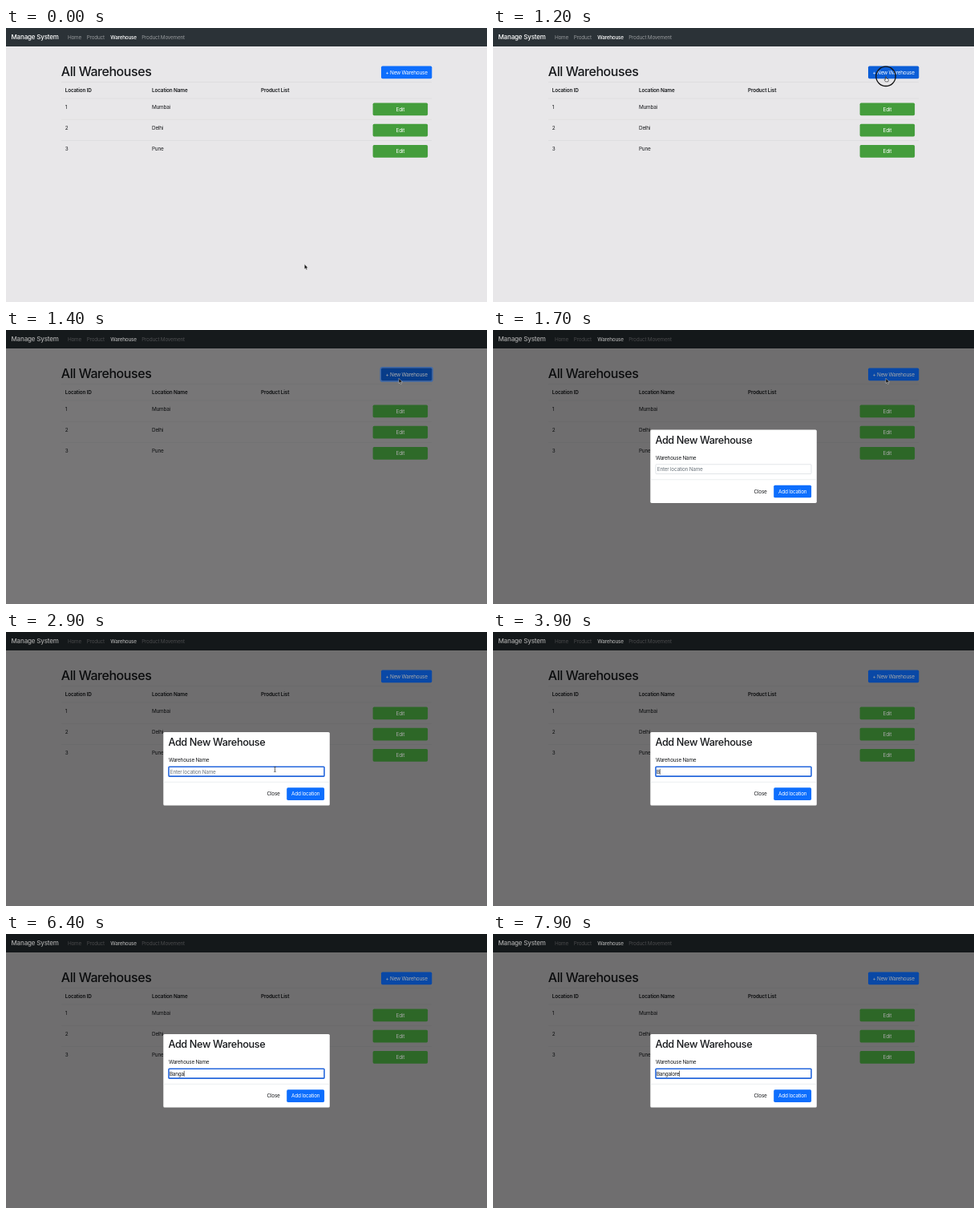
Animation, 600 px wide and 342 px high, one loop 8000 ms. Source, as an HTML page:

```html
<!DOCTYPE html>
<html lang="en">
<head>
<meta charset="utf-8">
<title>All Warehouses</title>
<style>
  html, body { margin: 0; width: 100%; height: 100%; overflow: hidden; background: #e8e7e9; }
  svg { display: block; width: 100vw; height: 100vh; }
  text { font: 400 6.4px Inter, "Open Sans", sans-serif; letter-spacing: -.035em; fill: #17191c; white-space: pre; }
  .brand { font-size: 8px; font-weight: 500; letter-spacing: -.022em; fill: #fff; }
  .link { fill: #95989b; }
  .active { font-weight: 500; fill: #fff; }
  .title { font-size: 16px; font-weight: 500; letter-spacing: -.028em; }
  .heading { font-size: 12.7px; font-weight: 500; letter-spacing: -.03em; }
  .head { font-weight: 600; letter-spacing: -.022em; }
  .label { fill: #fff; text-anchor: middle; }
  .rule { stroke: #d8d8da; stroke-width: .6; }
  .hint { fill: #6c757d; }
</style>
</head>
<body>
<svg viewBox="0 0 600 342" preserveAspectRatio="none">
  <rect width="600" height="342" fill="#e8e7e9"/>
  <rect width="600" height="23" fill="#2b3237"/>
  <g id="page"></g>
  <rect id="backdrop" width="600" height="342"/>
  <g id="vivid">
    <text class="brand" x="6.5" y="14.2">Manage System</text>
    <text class="active" x="130.3" y="14">Warehouse</text>
    <g id="edits"></g>
    <rect id="halo" x="467.2" y="46.8" width="64.9" height="17.3" rx="2.4" fill="none" stroke="#5b9bfb" stroke-width="1.5"/>
    <rect id="create" x="468" y="47.6" width="63.3" height="15.7" rx="1.7"/>
    <text class="label" x="499.6" y="58">+ New Warehouse</text>
  </g>
  <g id="modal">
    <rect x="196.3" y="125" width="207.5" height="91.5" rx="1.6" fill="#fff"/>
    <text class="heading" x="202.4" y="142.4">Add New Warehouse</text>
    <text x="202.9" y="162.4">Warehouse Name</text>
    <rect id="input" x="203" y="168.3" width="194" height="11.8" rx=".8" fill="#fff"/>
    <text id="hint" class="hint" x="204.8" y="176.6">Enter location Name</text>
    <text id="typed" x="203.9" y="176.6"></text>
    <rect id="caret" y="170.6" width=".6" height="7.4" fill="#111"/>
    <path d="M196.3 187.3H403.8" stroke="#dee2e6" stroke-width=".6"/>
    <text x="325.6" y="204.3">Close</text>
    <rect x="350.2" y="194.2" width="46.9" height="15.7" rx="1.7" fill="#0d6efd"/>
    <text class="label" x="373.7" y="204.3">Add location</text>
  </g>
  <g id="pointer">
    <circle id="ring" r="12.2" fill="none" stroke="#111" stroke-width="1.3"/>
    <path id="arrow" d="M0 0V6.2L1.4 5L2.4 7.2L3.4 6.8L2.5 4.6H4.4Z" fill="#111" stroke="#fff" stroke-width=".4"/>
    <path id="hand" d="M-.5 .4Q0-.2.5.4V2.7L3 3.3Q3.5 3.5 3.4 4.3L2.8 6.6H-.4L-2 4.2Q-1.8 3.4-.5 4.2Z" fill="#fff" stroke="#111" stroke-width=".6"/>
    <path id="beam" d="M-1.1-3Q0-3 0-2.2V2.6Q0 3.3-1.1 3.3M1.1-3Q0-3 0-2.2M0 2.6Q0 3.3 1.1 3.3" fill="none" stroke="#222" stroke-width=".7"/>
  </g>
</svg>
<script>
const LOOP = 8000, STEP = 100;
const $ = id => document.getElementById(id);
const smooth = p => p * p * (3 - 2 * p);
const easeOut = p => 1 - (1 - p) ** 2;

// Value at time t along [time, value] keys.
function track(t, keys, ease = p => p) {
  const next = keys.findIndex(([time]) => time > t);
  if (next === 0) return keys[0][1];
  if (next < 0) return keys[keys.length - 1][1];
  const [t0, v0] = keys[next - 1], [t1, v1] = keys[next];
  return v0 + (v1 - v0) * ease((t - t0) / (t1 - t0));
}
const within = (t, from, to) => t >= from && t < to;
const show = (id, on) => $(id).setAttribute("visibility", on ? "visible" : "hidden");
const label = (x, y, text, cls = "") => `<text class="${cls}" x="${x}" y="${y}">${text}</text>`;

const cities = ["Mumbai", "Delhi", "Pune"];
const rowY = i => 93.6 + i * 26.25;

$("page").innerHTML =
  label(76.9, 14, "Home", "link") +
  label(100.8, 14, "Product", "link") +
  label(169.2, 14, "Product Movement", "link") +
  label(68.8, 60, "All Warehouses", "title") +
  label(73.7, 80, "Location ID", "head") +
  label(182, 80, "Location Name", "head") +
  label(318, 80, "Product List", "head") +
  `<path class="rule" d="M69 67.6H531"/>` +
  cities.map((city, i) => {
    const y = rowY(i);
    return `<path class="rule" d="M69 ${y - 5.6}H531"/>` +
      label(73.7, y + 7.3, i + 1) + label(182, y + 7.3, city);
  }).join("");

$("edits").innerHTML = cities.map((_, i) =>
  `<rect x="457.6" y="${rowY(i)}" width="68.5" height="15.6" rx="1.7" fill="#449d3c"/>` +
  label(491.8, rowY(i) + 10.3, "Edit", "label")).join("");

const word = "Bangalore";
const keyTimes = [3300, 4300, 4500, 5500, 6300, 6900, 7500, 7700, 7900];
const pathX = [[0, 372.3], [900, 490], [1800, 490], [2200, 335.5]];
const pathY = [[0, 294.8], [900, 60.3], [1800, 60.3], [2200, 171.3]];
const dimming = [[1200, 0], [1300, .13], [1400, .49], [1500, .52]];

function render(t) {
  const dim = track(t, dimming);
  $("backdrop").setAttribute("opacity", dim);
  $("vivid").style.filter = dim ? `brightness(${1 - .66 * dim})` : "none";

  const hover = within(t, 800, 1500), pressed = within(t, 1300, 1500);
  $("create").setAttribute("fill", pressed ? "#0a58ca" : hover ? "#0b5ed7" : "#0d6efd");
  show("halo", within(t, 1300, 1600));

  $("modal").setAttribute("opacity", track(t, [[1450, 0], [1600, 1]]));
  $("modal").setAttribute("transform", `translate(0 ${track(t, [[1450, -20], [1750, 0]], easeOut)})`);
  const focused = t >= 2300;
  $("input").setAttribute("stroke", focused ? "#2567dc" : "#ced4da");
  $("input").setAttribute("stroke-width", focused ? 1.6 : .6);

  const count = keyTimes.filter(time => time <= t).length;
  $("typed").textContent = word.slice(0, count);
  show("hint", count === 0);
  show("caret", count > 0);
  $("caret").setAttribute("x", 203.9 + (count ? $("typed").getComputedTextLength() : 0));

  const x = track(t, pathX, smooth), y = track(t, pathY, smooth);
  const beam = within(t, 2200, 3300), hand = within(t, 800, 1300);
  $("pointer").setAttribute("transform", `translate(${x} ${y})`);
  show("beam", beam);
  show("hand", hand);
  show("arrow", t < 2200 && !hand);
  show("ring", within(t, 1100, 1300) || within(t, 2200, 2300));
}

const start = performance.now();
function tick() {
  const t = (performance.now() - start) % LOOP;
  render(Math.floor(t / STEP) * STEP);
  requestAnimationFrame(tick);
}
tick();
</script>
</body>
</html>
```
